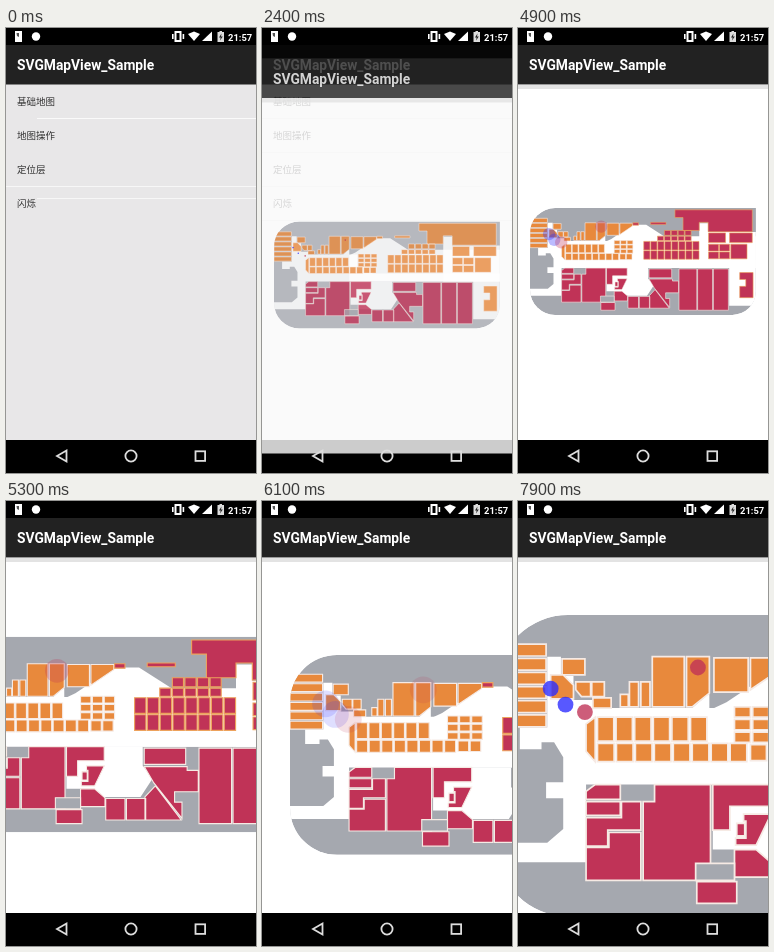
An HTML page with a canvas that plays this animation: 250x445 px, repeating every 8000 ms.

```html
<!DOCTYPE html>
<html lang="zh">
<head>
<meta charset="utf-8">
<title>SVGMapView_Sample</title>
<style>
html, body { margin: 0; width: 100%; height: 100%; overflow: hidden; background: #000; }
canvas { display: block; width: 250px; height: 445px; }
</style>
</head>
<body>
<canvas id="stage"></canvas>
<script>
const W = 250, H = 445, LOOP = 8000, STEP = 100;
const canvas = document.getElementById('stage');
const ratio = window.devicePixelRatio || 1;
canvas.width = W * ratio;
canvas.height = H * ratio;
const ctx = canvas.getContext('2d');

const ORANGE = '#e8893c', RED = '#c03357', GRAY = '#a5a8af', WALL = '#f6eae4';

// Floor plan units: UNIT of them make one pixel at zoom 1
const UNIT = 2.47, PLAN = { x: -3, y: 128.5, w: 558, h: 264 };

// Block of equal rooms: corner, room size, columns, rows
function grid(x, y, w, h, cols = 1, rows = 1) {
  let d = '';
  for (let i = 0; i < cols * rows; i++) {
    const left = x + (i % cols) * w, top = y + Math.floor(i / cols) * h;
    d += `M${left + 1} ${top + 1}h${w - 2}v${h - 2}h${2 - w}Z`;
  }
  return d;
}
const shape = (...parts) => new Path2D(parts.join(''));

const ground = new Path2D();
ground.roundRect(PLAN.x, PLAN.y, PLAN.w, PLAN.h, [62, 0, 58, 62]);

const walks = [
  // west hall and the two long corridors
  shape('M41 165H53V182H64V203H81V210H168L183 197V210H203V240H240V257H555V277H75V345H-3V328H41',
    'L55 316V289H40V275H55V253L47 240H36V246H17V227H41Z'),
  // central concourse and stem
  shape('M183 212L198 205L250 170H284L328 198H555V277H183Z'),
  // south pavilion with its entrances
  shape('M186 277H289V303L303 319L286 345H205V334H186Z'),
  // east hall
  shape('M415 166H437V188H555V370H489V277H415Z')
];

const orangeRooms = shape(
  grid(-4, 153, 45, 12.4, 1, 6),
  grid(53, 166, 22, 16), grid(79, 186, 13, 15), grid(80, 200, 18, 11), grid(104, 197, 9, 13),
  'M44 181H55L64 190V202H44Z M66 187H79V200H71L66 194Z',
  grid(112, 186, 10, 24, 2), grid(132, 164, 30, 46),
  'M163 165H183V197L168 209H163Z M187 166H217V196H187Z M219 166H250V173L219 194Z',
  'M75 224L83 218V257L75 248Z',
  grid(84, 217, 16.3, 23, 6), grid(84, 240, 16.6, 18, 8),
  grid(204, 208, 16, 11, 3, 3), grid(218, 241, 16, 16, 2)
);

const eastRooms = shape(
  'M355 133H546V187H437V164H415V184H375V152H355Z M438 190H480V214H438Z',
  'M490 190H546V214H490Z',
  grid(250, 164, 16, 8), grid(294, 163, 40, 7),
  grid(328, 183, 17, 14, 4), grid(311, 197, 17, 13, 5),
  grid(277, 210, 17.3, 23, 8, 2),
  grid(437, 217, 27, 19, 2, 2), grid(492, 217, 42, 38),
  'M515 288H548V350H515V322H530V305H515Z'
);

const redRooms = shape(
  'M75 283L83 277H105V290H75Z', grid(74, 291, 32, 14),
  'M75 306H106V292H123V317H94V331H75Z M75 332H95V319H123V361H75Z',
  'M125 292H135V277H184V361H125Z',
  'M186 277H237V296H201V317H186Z M213 303H237L224 330H206V324H215V309H213Z',
  'M205 334H224L238 346V358H205Z',
  grid(206, 310, 9, 13), grid(171, 361, 37, 21), grid(238, 346, 28, 31, 2),
  'M291 279H347V301H291Z M291 304H349V309H364V338H332V352H342V374L304 326Z',
  'M292 345L306 330L341 376H292Z',
  'M365 279H409V381H365Z', grid(410, 278, 39, 104, 2)
);
const grayRooms = shape(grid(170, 345, 36, 17));

const BLUE = '#2c2cff';
const dots = [[44, 193, BLUE], [57, 207, BLUE], [74, 213.5, RED], [173, 174.5, RED]];

// Piecewise linear values from [time, ...values] keys
function track(keys, t) {
  const n = keys.findIndex(k => k[0] > t);
  if (n === 0) return keys[0].slice(1);
  if (n < 0) return keys[keys.length - 1].slice(1);
  const a = keys[n - 1], b = keys[n], p = (t - a[0]) / (b[0] - a[0]);
  return a.slice(1).map((v, i) => v + (b[i + 1] - v) * p);
}

// time, left, top, zoom: pinch, drag, pinch
const camera = [
  [4900, 12, 180, 1], [5320, -84, 133.5, 1.87], [5500, -84, 133.5, 1.87],
  [5900, 28, 154, 1.87], [6200, 28, 154, 1.87], [6800, -3, 128.5, 2.47], [7400, -21, 114, 2.82]
];
// time, dot radius
const pulse = [[2400, 0.8], [4100, 5.5], [6500, 7.5], [6500, 0], [7900, 2.8]];
// time, shift, opacity
const entry = [[2400, 13.5, 0.8], [2600, 0, 1]];

function box(x, y, w, h, color) {
  ctx.fillStyle = color;
  ctx.fillRect(x, y, w, h);
}

function label(text, x, y, font, color) {
  ctx.font = font;
  ctx.fillStyle = color;
  ctx.fillText(text, x, y);
}

function poly(points, fill) {
  ctx.beginPath();
  points.forEach(p => ctx.lineTo(...p));
  ctx.closePath();
  if (fill) { ctx.fillStyle = fill; ctx.fill(); }
  else ctx.stroke();
}

function disc(x, y, r, color) {
  ctx.beginPath();
  ctx.arc(x, y, r, 0, Math.PI * 2);
  ctx.fillStyle = color;
  ctx.fill();
}

function header() {
  box(0, 0, W, 17, '#000');
  box(0, 17, W, 39.5, '#222');
  label('SVGMapView_Sample', 11, 42.4, 'bold 13.8px Roboto, sans-serif', '#fff');
}

function listScreen(t) {
  box(0, 0, W, 412, '#e8e7e8');
  header();
  if (t < 1800) {
    box(31, 90, 219, 1, '#fafafa');
    box(0, 158, W, 1, '#f7f7f7');
    box(31, 170, 219, 1, '#f7f7f7');
  } else {
    for (let y = 90; y < 200; y += 34) box(0, y, W, 1, '#d9d8d9');
  }
  ['基础地图', '地图操作', '定位层', '闪烁'].forEach((s, i) =>
    label(s, 11, 76.5 + i * 34, '9.5px "Noto Sans CJK SC", "Noto Sans CJK", sans-serif', '#333'));
}

function rooms(path, fill, line = WALL) {
  ctx.fillStyle = fill;
  ctx.fill(path);
  ctx.strokeStyle = line;
  ctx.lineWidth = 1.5;
  ctx.stroke(path);
}

function drawPlan(t) {
  const [left, top, zoom] = track(camera, t);
  ctx.save();
  ctx.beginPath();
  ctx.rect(0, 61, W, 351);
  ctx.clip();
  ctx.translate(left, top);
  ctx.scale(zoom / UNIT, zoom / UNIT);
  ctx.translate(-PLAN.x, -PLAN.y);
  ctx.save();
  ctx.clip(ground);
  ctx.fillStyle = GRAY;
  ctx.fill(ground);
  ctx.fillStyle = '#fff';
  walks.forEach(p => ctx.fill(p));
  rooms(orangeRooms, ORANGE);
  rooms(redRooms, RED);
  rooms(grayRooms, GRAY);
  if (t < 2500) rooms(eastRooms, ORANGE);
  else rooms(eastRooms, RED, '#eda25c');
  ctx.restore();

  const [r] = track(pulse, t);
  ctx.globalAlpha *= 1 - (r / 8) ** 1.5;
  dots.forEach(([x, y, color]) => disc(x, y, r * UNIT, color));
  ctx.restore();
}

function mapScreen(t) {
  const [shift, alpha] = track(entry, t);
  ctx.save();
  ctx.globalAlpha = alpha;
  ctx.translate(0, shift);
  box(0, 56.5, W, 355.5, '#fff');
  header();
  box(0, 56.5, W, 4.5, '#e3e3e3');
  drawPlan(t);
  ctx.restore();
}

function statusBar() {
  box(0, 0, W, 17, '#000');
  box(9, 3, 7, 11, '#fff');
  poly([[10.5, 5], [13, 5], [13, 9], [11, 8]], '#555');
  disc(30, 8.5, 4.2, '#fff');
  ctx.strokeStyle = '#fff';
  ctx.lineWidth = 2;
  ctx.strokeRect(169.5, 4, 5, 9);
  box(166, 6, 1.6, 5, '#fff');
  box(176.6, 6, 1.6, 5, '#fff');
  poly([[182, 6], [188, 3.5], [194, 6], [188, 13]], '#fff');
  poly([[196, 13], [206, 3.5], [206, 13]], '#fff');
  box(211.5, 4, 6.5, 10, '#ddd');
  box(213.5, 3, 2.5, 1, '#ddd');
  poly([[215.5, 5.5], [213, 9.5], [214.7, 9.5], [214, 12.5], [216.8, 8.5], [215, 8.5]], '#222');
  label('21:57', 222, 12.5, 'bold 9.4px Roboto, sans-serif', '#fff');
}

function navIcons() {
  ctx.strokeStyle = '#ddd';
  ctx.lineWidth = 1.8;
  poly([[51, 428], [60.5, 422.5], [60.5, 433.5]]);
  ctx.beginPath();
  ctx.arc(125, 428, 5.6, 0, Math.PI * 2);
  ctx.stroke();
  ctx.strokeRect(189.5, 423.3, 9.6, 9.6);
}

function draw(t) {
  ctx.setTransform(ratio, 0, 0, ratio, 0, 0);
  box(0, 0, W, H, '#000');
  if (t < 2600) listScreen(t);
  if (t >= 2400) mapScreen(t);
  statusBar();
  navIcons();
}

const start = performance.now();
function tick() {
  const t = (performance.now() - start) % LOOP;
  draw(Math.floor(t / STEP) * STEP);
  requestAnimationFrame(tick);
}
tick();
</script>
</body>
</html>
```
